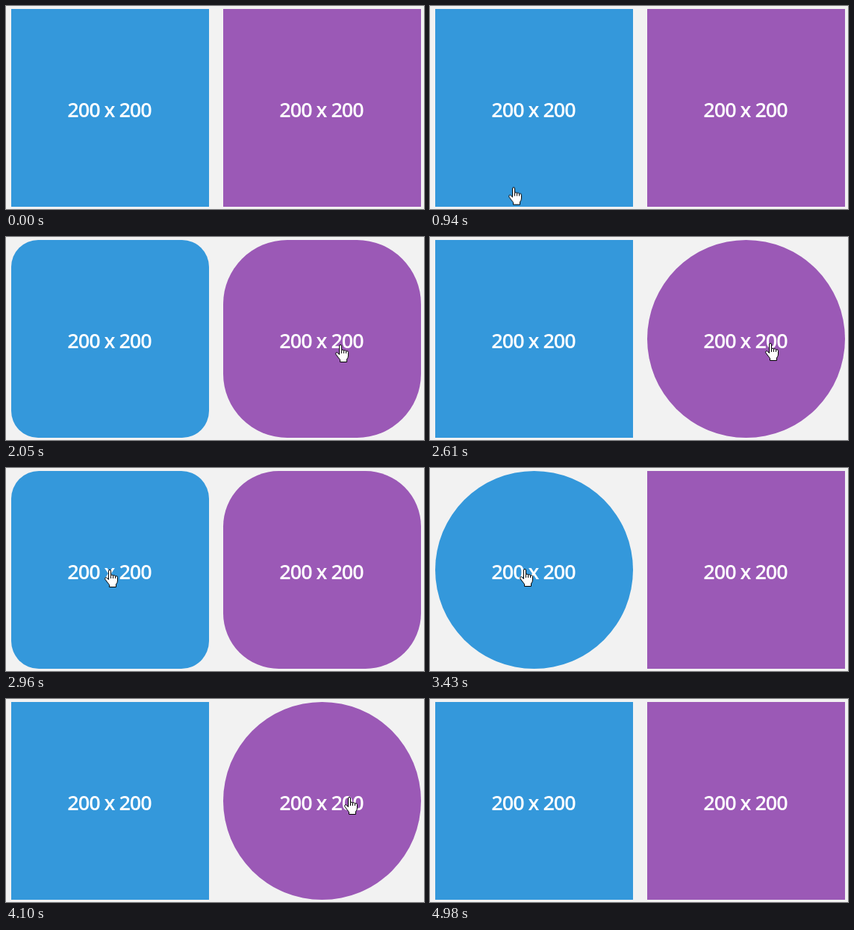
An HTML page for the animation above (5620 ms loop, 560x272 px).

```html
<!DOCTYPE html>
<html lang="en">
<head>
<meta charset="utf-8">
<title>Hover to circle</title>
<style>
  html, body { margin: 0; width: 100%; height: 100%; overflow: hidden; background: #f2f2f2; }
  .stage { position: relative; width: 560px; height: 272px; overflow: hidden; }
  .stage > * { position: absolute; animation: 5620ms linear infinite; }

  .box { top: 4px; width: 265px; height: 265px; }
  .blue { left: 7px; background: #3498db; animation-name: blue; }
  .purple { left: 291px; background: #9b59b6; animation-name: purple; }
  .box span {
    position: absolute; left: 0; right: 0; top: 115px;
    font: 600 27px/40px "Open Sans", "Noto Sans", sans-serif;
    letter-spacing: -1px; text-align: center; text-indent: -2px;
    white-space: nowrap; color: #fff;
  }

  .hand {
    left: -7px; top: -1px; width: 19px; height: 25px; overflow: visible;
    fill: #fff; stroke: #000; stroke-linejoin: round;
    animation-name: travel, show; animation-timing-function: linear, step-end;
  }

  /* Each hover change is a 300 ms ease */
  @keyframes blue {
    0%, 100% { border-radius: 0; }
    16.904% { border-radius: 0; animation-timing-function: ease; }
    22.242% { border-radius: 50%; }
    34.181% { border-radius: 50%; animation-timing-function: ease; }
    39.520% { border-radius: 0; }
    51.655% { border-radius: 0; animation-timing-function: ease; }
    56.993% { border-radius: 50%; }
    67.349% { border-radius: 50%; animation-timing-function: ease; }
    72.687% { border-radius: 0; }
  }
  @keyframes purple {
    0%, 100% { border-radius: 0; }
    34.484% { border-radius: 0; animation-timing-function: ease; }
    39.822% { border-radius: 50%; }
    51.281% { border-radius: 50%; animation-timing-function: ease; }
    56.619% { border-radius: 0; }
    67.616% { border-radius: 0; animation-timing-function: ease; }
    72.954% { border-radius: 50%; }
    83.452% { border-radius: 50%; animation-timing-function: ease; }
    88.790% { border-radius: 0; }
  }

  /* Fingertip position */
  @keyframes travel {
    0%, 16.726% { transform: translate(112px, 244px); animation-timing-function: ease-out; }
    23.310% { transform: translate(123px, 152px); }
    28.292% { transform: translate(123px, 152px); animation-timing-function: ease-in; }
    34.181% { transform: translate(272px, 149px); }
    34.484% { transform: translate(291px, 148px); }
    36.477% { transform: translate(448px, 145px); animation-timing-function: ease-out; }
    39.146% { transform: translate(456px, 143px); }
    46.441% { transform: translate(456px, 143px); animation-timing-function: ease-in; }
    51.281% { transform: translate(291px, 140px); }
    51.655% { transform: translate(272px, 140px); }
    52.669% { transform: translate(139px, 137px); animation-timing-function: ease-out; }
    56.940% { transform: translate(127px, 136px); }
    61.300% { transform: translate(127px, 136px); animation-timing-function: ease-in; }
    67.349% { transform: translate(272px, 134px); }
    67.616% { transform: translate(291px, 134px); animation-timing-function: ease-out; }
    72.954% { transform: translate(460px, 132px); }
    77.758% { transform: translate(460px, 132px); animation-timing-function: ease-in; }
    83.452%, 100% { transform: translate(464px, 246px); }
  }
  @keyframes show {
    0% { opacity: 0; }
    16.726% { opacity: 1; }
    83.452%, 100% { opacity: 0; }
  }
</style>
</head>
<body>
<div class="stage">
  <div class="box blue"><span>200 x 200</span></div>
  <div class="box purple"><span>200 x 200</span></div>
  <svg class="hand" viewBox="0 0 19 25">
    <path d="M5.5 13.5V2Q5.5 .5 7 .5T8.5 2V7.5Q10 6.5 11.5 8Q13 7 14.5 8.8Q17.5 8.3 17.5 10.5V15Q17.5 17.5 15.5 20V23.5H6.5V20.5Q4 17.5 .6 12.8Q.6 10.5 2.5 10.7Z"/>
    <path fill="none" d="M8.5 7.5V12M11.5 8V12M14.5 9V12"/>
  </svg>
</div>
</body>
</html>
```
